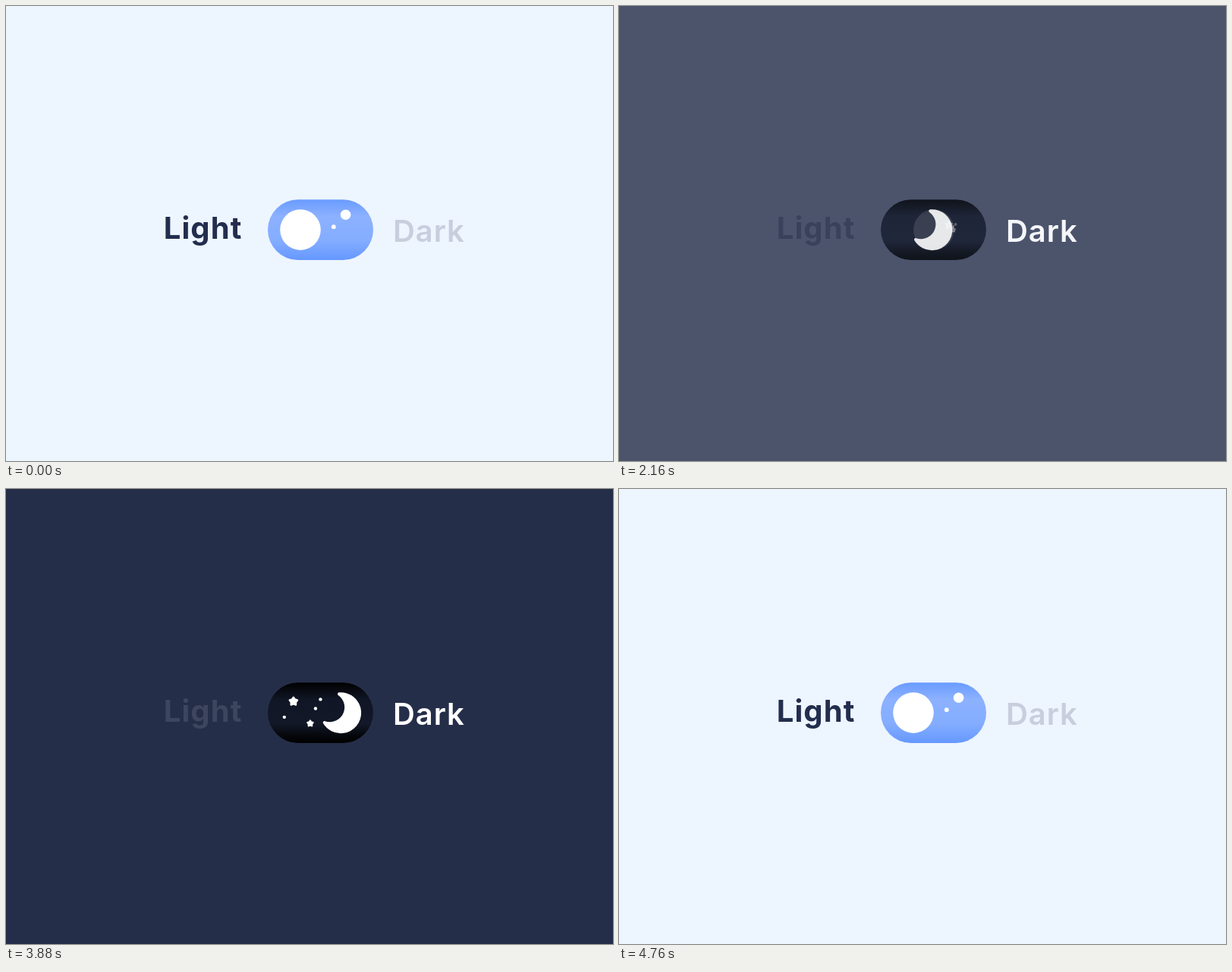
An HTML page with a canvas that plays this animation: 800x600 px, repeating every 4800 ms.

```html
<!DOCTYPE html>
<html lang="en">
<head>
<meta charset="utf-8">
<title>Light and dark switch</title>
<style>
  html, body { margin: 0; width: 100%; height: 100%; overflow: hidden; background: #edf5ff; }
  canvas { display: block; }
</style>
</head>
<body>
<canvas id="stage" width="800" height="600"></canvas>
<script>
const ctx = document.getElementById("stage").getContext("2d");
const LOOP = 4800, STEP = 40, DURATION = 570;
const TO_DARK = 1900, TO_LIGHT = 3820;
const RAD = Math.PI / 180;

const clamp = v => Math.min(1, Math.max(0, v));
const lerp = (a, b, k) => a + (b - a) * k;
const smooth = (a, b, v) => { const k = clamp((v - a) / (b - a)); return k * k * (3 - 2 * k); };
const mix = (a, b, k) => `rgb(${a.map((v, i) => Math.round(lerp(v, b[i], k))).join()})`;

// Cubic bezier timing (0.54, 0, 0.37, 1), solved by bisection.
function ease(u) {
  if (u <= 0) return 0;
  if (u >= 1) return 1;
  let lo = 0, hi = 1;
  for (let i = 0; i < 24; i++) {
    const s = (lo + hi) / 2, r = 1 - s;
    if (3 * 0.54 * s * r * r + 3 * 0.37 * s * s * r + s * s * s < u) lo = s; else hi = s;
  }
  return lo * lo * (3 - 2 * lo);
}

// Colours turn faster than the knob travels; `bias` moves the turning point.
function fade(q, bias) {
  if (q <= 0 || q >= 1) return q;
  return 1 / (1 + Math.exp(-3.1 * (Math.log(q / (1 - q)) + bias)));
}

// Small overshoot that builds up near the end of a move and then dies away.
function settle(age) {
  if (age < 0 || age > 1220) return 0;
  return smooth(200, 580, age) * Math.exp((620 - Math.max(age, 580)) / 90);
}

function gradient(stops) {
  const g = ctx.createLinearGradient(0, 255, 0, 335);
  stops.forEach(([at, color]) => g.addColorStop(at, color));
  return g;
}
const dayFill = gradient([[0, "#699bff"], [0.28, "#8cb1ff"], [0.68, "#84adff"], [1, "#6598ff"]]);
const nightFill = gradient([[0, "#000"], [0.28, "#101625"], [0.68, "#121828"], [0.88, "#05070b"], [1, "#000"]]);

function pill(fill, alpha) {
  ctx.globalAlpha = alpha;
  ctx.fillStyle = fill;
  ctx.beginPath();
  ctx.roundRect(345, 255.2, 139, 79.8, 39.9);
  ctx.fill();
}

function disc(x, y, r) {
  ctx.beginPath();
  ctx.arc(x, y, r, 0, 2 * Math.PI);
  ctx.fill();
}

function moon(x, y) {
  const cut = { x: -14.4, y: -7.4, r: 19.4 }, tipR = 2;
  const tip = deg => {
    const px = 25 * Math.cos(deg * RAD), py = 25 * Math.sin(deg * RAD);
    return { x: px, y: py, out: deg * RAD, fromCut: Math.atan2(py - cut.y, px - cut.x) };
  };
  const low = tip(149), high = tip(265);
  ctx.save();
  ctx.translate(x, y);
  ctx.beginPath();
  ctx.arc(0, 0, 27, high.out, low.out);
  ctx.arc(low.x, low.y, tipR, low.out, low.fromCut + Math.PI);
  ctx.arc(cut.x, cut.y, cut.r, low.fromCut, high.fromCut, true);
  ctx.arc(high.x, high.y, tipR, high.fromCut + Math.PI, high.out);
  ctx.fill();
  ctx.restore();
}

function star(x, y, size) {
  ctx.beginPath();
  for (let i = 0; i < 10; i++) {
    const r = size * (i % 2 ? 0.5 : 0.82), a = (i * 36 - 90) * RAD;
    ctx.lineTo(x + r * Math.cos(a), y + r * Math.sin(a));
  }
  ctx.closePath();
  ctx.lineWidth = size * 0.36;
  ctx.lineJoin = "round";
  ctx.fill();
  ctx.stroke();
}

// Resting place, size and overshoot of everything in the night sky.
const sky = [
  { draw: star, x: 377.8, y: 280, size: 6.6, dx: -4.8, dy: -0.8 },
  { draw: star, x: 400.2, y: 309.5, size: 5, dx: 0.8, dy: 0 },
  { draw: disc, x: 413.9, y: 277.2, size: 2.2, dx: 1.1, dy: 0.2 },
  { draw: disc, x: 407.3, y: 289.5, size: 2.2, dx: -15.6, dy: -0.6 },
  { draw: disc, x: 365.6, y: 301, size: 2.2, dx: -1.6, dy: 0.2 }
];

function label(text, weight, x, y, spacing, color) {
  ctx.font = `${weight} 40px Inter, "Open Sans", sans-serif`;
  ctx.letterSpacing = spacing + "px";
  ctx.fillStyle = color;
  ctx.fillText(text, x, y);
}

function draw(t) {
  const toDark = t < TO_LIGHT;
  const age = t - (toDark ? TO_DARK : TO_LIGHT);
  const q = toDark ? ease(age / DURATION) : 1 - ease(age / DURATION);
  const wobble = settle(age);
  const night = fade(q, 0.56), knob = fade(q, 0.73);

  ctx.globalAlpha = 1;
  ctx.fillStyle = mix([237, 245, 255], [37, 46, 73], night);
  ctx.fillRect(0, 0, 800, 600);
  label("Light", 700, 207.7, 306.5, 1.1, mix([35, 46, 78], [62, 69, 94], night));
  label("Dark", 600, 510, 310.5, 0.9, mix([200, 206, 221], [255, 255, 255], night));

  // The two tracks cross-fade over the page colour.
  pill(dayFill, 1 - night);
  pill(nightFill, night);

  ctx.fillStyle = ctx.strokeStyle = "#fff";
  ctx.globalAlpha = (1 - knob) * (1 - smooth(0.1, 0.48, q));
  disc(447.6 - 137 * q, 275.3, 6.8);
  disc(431.8 - 71 * q, 291.2, 2.9);

  const spread = toDark ? q * q : q;
  const starAlpha = smooth(0.35, 0.7, q);
  if (starAlpha > 0) {
    ctx.globalAlpha = starAlpha;
    const drift = toDark ? wobble : 0;
    for (const s of sky) {
      s.draw(lerp(452, s.x, spread) + s.dx * drift,
             lerp(291, s.y, spread) + s.dy * drift,
             s.size * lerp(0.8, 1, spread));
    }
  }

  const nudge = 0.4 * wobble * (toDark ? 1 : -1);
  ctx.globalAlpha = 1 - knob;
  disc(lerp(388, 444.5, q) + nudge, 295.1, 26.8);
  ctx.globalAlpha = knob;
  moon(lerp(385.5, 442, q) + nudge, 295.2);
}

function tick() {
  const t = performance.now() % LOOP;
  draw(Math.floor(t / STEP) * STEP);
  requestAnimationFrame(tick);
}
tick();
</script>
</body>
</html>
```
